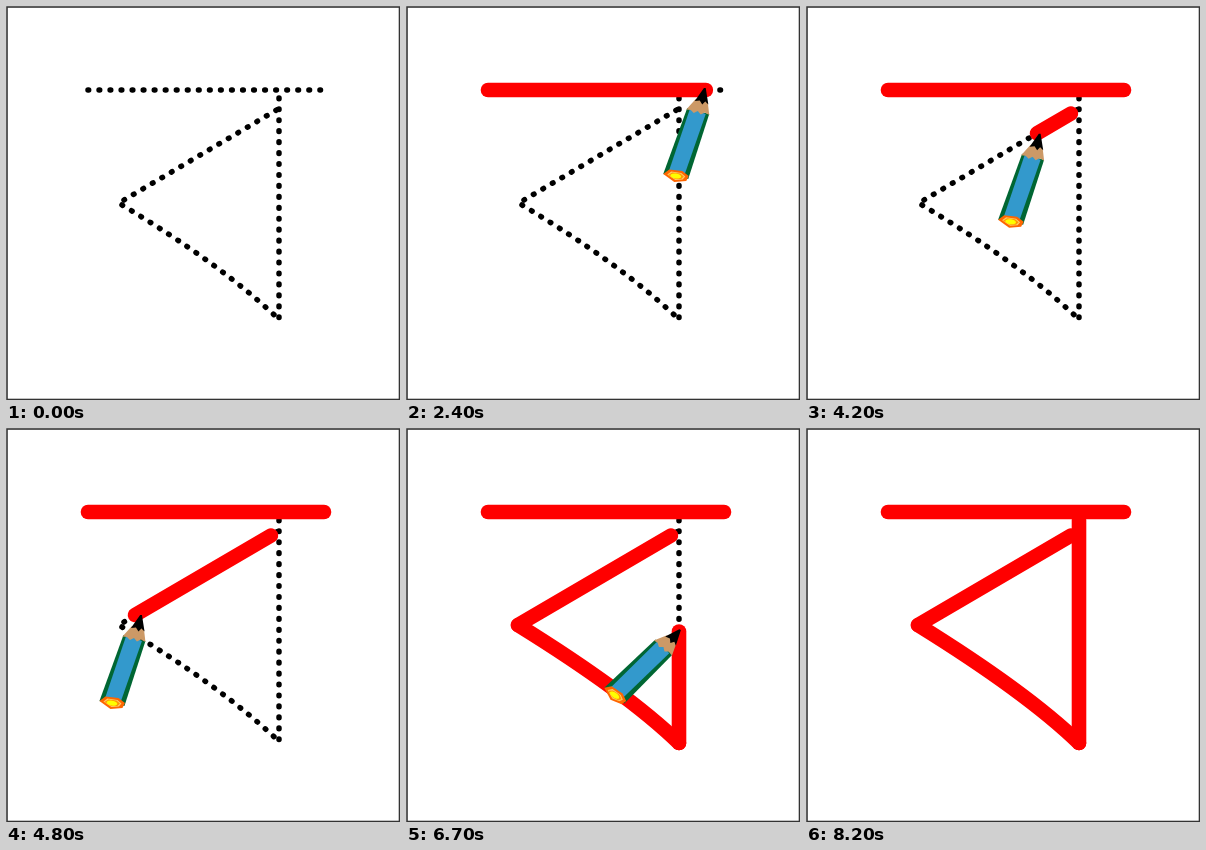
Write an HTML page that moves like this. It is 394x394 px and loops after 8.3 s.

```html
<!DOCTYPE html>
<html lang="en">
<head>
<meta charset="utf-8">
<title>Letter tracing</title>
<style>
html, body { margin: 0; width: 100%; height: 100%; overflow: hidden; background: #fff; }
svg { display: block; width: 100vw; height: 100vh; }
.dots path { fill: none; stroke: #000; stroke-width: 5.5; stroke-linecap: round; stroke-dasharray: .06 .94; }
.ink path { fill: none; stroke: #f00; stroke-width: 14.6; stroke-linecap: round; stroke-linejoin: round; }
</style>
</head>
<body>
<svg viewBox="0 0 394 394">
  <rect width="394" height="394" fill="#fff"/>
  <g class="dots">
    <path d="M82 84H314.5" pathLength="21.05"/>
    <path d="M273 92V311.5" pathLength="20.05"/>
    <path d="M270.5 104L118 194" pathLength="16.05"/>
    <path d="M116 199Q213 257 271 311.5" pathLength="17.45"/>
  </g>
  <g class="ink" id="ink"></g>
  <g id="pencil">
    <path fill="#063" d="M-17.5 20L4.5 26L-16.5 91L-41.5 86Z"/>
    <path fill="#39c" d="M-14.5 20L1 26L-21 89L-36.5 85Z"/>
    <path fill="#c96" d="M-9 11L-18.5 21.5L-14 22L-11 25L-7 23L-4 26.5L0 24.5L4.5 27L3 14Z"/>
    <path d="M-.8 0H1L3.6 16.5L.5 13.5L-2.5 16.5L-5 12.5L-10 13Z"/>
    <g transform="translate(-.5 1)">
      <path fill="#f60" d="M-41 85L-35 80.5L-22 82L-15.5 87L-18 92L-30 93Z"/>
      <path fill="#fc6" d="M-37 85.5L-33 82.5L-23 84L-19 87.5L-21.5 90.5L-29 91Z"/>
      <path fill="#f90" d="M-36 86L-32 83.5L-24 84.5L-20.5 87.5L-23 90L-29 90Z"/>
      <ellipse cx="-28.5" cy="87" rx="5.4" ry="2.5" fill="#ff0" transform="rotate(8 -28.5 87)"/>
    </g>
  </g>
  <rect x="1" y="1" width="392.5" height="392.5" fill="none" stroke="#333" stroke-width="1.6"/>
</svg>
<script>
const LOOP = 8300, STEP = 100;
const TILT = 53.4; // extra lean of the pencil at the lower corner

// start, control and end points with first and last step
const strokes = [
  { p: [[82, 84], [200, 84], [318, 84]], from: 0, to: 26 },
  { p: [[265, 107.5], [188.5, 152.25], [112, 197]], from: 40, to: 49 },
  { p: [[112, 197], [221, 264.6], [273, 315]], from: 51, to: 61 },
  { p: [[273, 315], [273, 203.5], [273, 92]], from: 61, to: 73 }
];

// pencil stops along the first two strokes
const first = [83, 82], lift = [317.5, 82], second = [266.5, 108], corner = [118.5, 197];

const pencil = document.getElementById('pencil');
const ink = document.getElementById('ink');
for (const s of strokes) {
  s.el = document.createElementNS('http://www.w3.org/2000/svg', 'path');
  ink.appendChild(s.el);
}

const part = (n, a, b) => Math.min(1, Math.max(0, (n - a) / (b - a)));
const mix = (a, b, k) => a + (b - a) * k;
const mixPt = (a, b, k) => [mix(a[0], b[0], k), mix(a[1], b[1], k)];

// first k of a quadratic curve
function cut([a, c, b], k) {
  const m = mixPt(a, c, k);
  return [m, mixPt(m, mixPt(c, b, k), k)];
}

// tip position and extra rotation
function pose(n) {
  if (n <= 26) return [...mixPt(first, lift, part(n, 1, 26)), 0];
  if (n <= 40) return [...mixPt(lift, second, part(n, 26, 40)), 0];
  if (n <= 51) return [...mixPt(second, corner, part(n, 40, 49)), 0];
  if (n <= 61) {
    const k = part(n, 51, 61);
    const [x, y] = cut(strokes[2].p, k)[1];
    return [x + mix(6, 1, k), y, TILT * k];
  }
  const k = part(n, 61, 73);
  return [274, mix(315, 88, k), TILT * (1 - k)];
}

function draw(time) {
  const n = Math.floor((time % LOOP) / STEP);
  for (const s of strokes) {
    const [m, e] = cut(s.p, part(n, s.from, s.to));
    s.el.setAttribute('d', `M${s.p[0]}Q${m} ${e}`);
    s.el.style.display = n > s.from ? '' : 'none';
  }
  const [x, y, turn] = pose(n);
  pencil.setAttribute('transform', `translate(${x} ${y}) rotate(${turn})`);
  pencil.style.display = n > 0 && n < 82 ? '' : 'none';
}

const begin = performance.now();
function tick() {
  draw(performance.now() - begin);
  requestAnimationFrame(tick);
}
tick();
</script>
</body>
</html>
```
